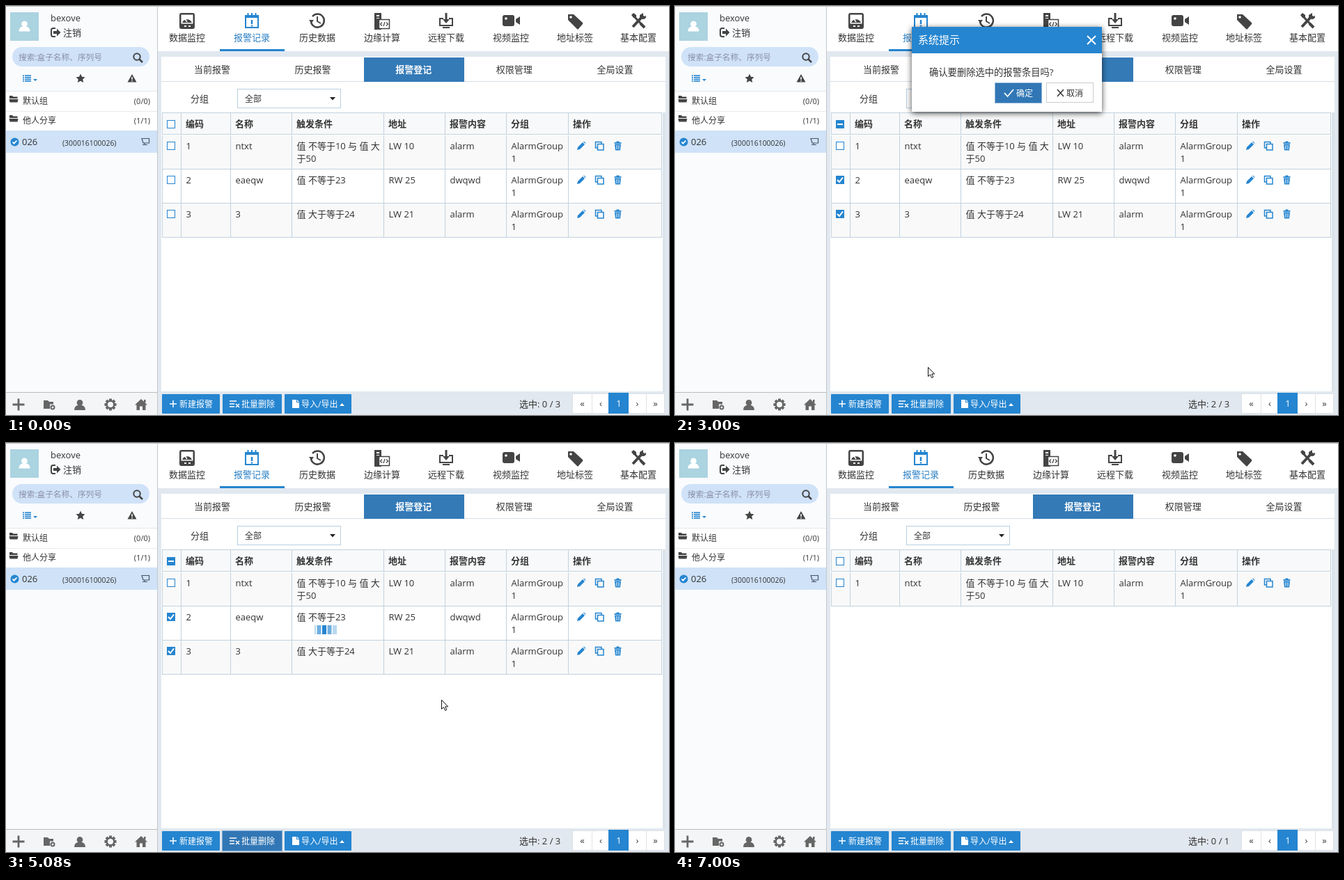
These frames come from a looping animation (952x588 px, 7.08 s). An HTML page:

```html
<!DOCTYPE html>
<html lang="zh-CN">
<head>
<meta charset="utf-8">
<title>报警登记</title>
<style>
html, body { margin: 0; width: 100%; height: 100%; overflow: hidden; background: #fff; }
svg { display: block; width: 100%; height: 100%; }
text { font-family: "Open Sans", "Noto Sans CJK SC", "Noto Sans CJK", "Noto Sans", sans-serif; font-size: 13px; fill: #333; white-space: pre; }
.mid { text-anchor: middle; }
.s12 { font-size: 12px; }
.s11 { font-size: 11px; }
.bold { font-weight: 700; }
.white { fill: #fff; }
.blue { fill: #2a7fc4; }
.line { fill: none; stroke-width: 1.5; }
#dialog { filter: drop-shadow(0 2px 4.5px rgba(0, 0, 0, .72)); }
</style>
</head>
<body>
<svg id="stage" viewBox="0 0 952 588"></svg>
<script>
const LOOP = 7080, FRAME = 1000 / 13;
const BLUE = '#2585d0', DARK = '#3277b5', INK = '#444', GRID = '#c2d2de';

const rect = (x, y, w, h, fill, extra = '') =>
  `<rect x="${x}" y="${y}" width="${w}" height="${h}" fill="${fill}" ${extra}/>`;
const box = (x, y, w, h, stroke, fill = '#fff', extra = '') =>
  rect(x + .5, y + .5, w - 1, h - 1, fill, `stroke="${stroke}" ${extra}`);
// y is the vertical centre of the line
const text = (x, y, s, cls = '', extra = '') =>
  `<text x="${x}" y="${y + 5}" class="${cls}" ${extra}>${s}</text>`;
const fill = (d, color, extra = '') => `<path d="${d}" fill="${color}" ${extra}/>`;
const line = (d, color, width = 1.5, extra = '') =>
  `<path d="${d}" class="line" stroke="${color}" style="stroke-width:${width}" ${extra}/>`;
const at = (x, y, body, id = '') => `<g ${id && `id="${id}"`} transform="translate(${x} ${y})">${body}</g>`;

const person = 'M0-8a4.3 4.3 0 0 1 2.5 7.8Q8 1 8 7H-8Q-8 1-2.5-.2A4.3 4.3 0 0 1 0-8Z';
const folder = 'M-6-5h4l1.5 1.5h6V-1H-6ZM-6.5 0H6.5L5.5 4.5H-5.5Z';

function sidebar() {
  const grey = '#666';
  const groupRow = (y, name, count) =>
    at(11, y, fill(folder, INK)) + text(24, y + 1.5, name, 's12') +
    text(207, y + 2, count, 's11', 'text-anchor="end"');
  const teeth = [0, 45, 90, 135].map(a => rect(-2, -8.5, 4, 17, grey, `transform="rotate(${a})"`)).join('');
  return rect(0, 0, 217, 588, '#f9fbfd') + rect(0, 122, 217, 57, '#fff') +
    rect(6, 9, 41, 41, '#abd3e0') + at(26.5, 29.5, fill(person, '#fff')) +
    text(64, 17, 'bexove') +
    at(71, 38, line('M0-6H-3.5Q-6-6-6-3V3Q-6 6-3.5 6H0', INK, 2) + fill('M-3-2H2V-5.5L7.5 0 2 5.5V2H-3Z', INK)) +
    text(82, 38, '注销') +
    rect(9, 59, 197, 28, '#cfe2f8', 'rx="14"') +
    text(18, 73, '搜索:盒子名称、序列号', '', 'style="font-size:11.7px;fill:#8a8fa6"') +
    at(189, 74, `<circle cx="-1" cy="-1" r="4.7" class="line" stroke="${INK}" style="stroke-width:2"/>` + line('M2.5 2.5L7 7', INK, 2.5)) +
    at(30, 104, [-4, -1.3, 1.4, 4].map(y => rect(-6, y - .8, 2, 1.6, BLUE) + rect(-3, y - .8, 9, 1.6, BLUE)).join('') + fill('M9 1h6l-3 3Z', BLUE)) +
    at(107, 104, fill('M0-6.5L2-2.2 6.5-1.8 3.2 1.4 4.2 6 0 3.7-4.2 6-3.2 1.4-6.5-1.8-2-2.2Z', INK)) +
    at(181, 104, fill('M0-6L6.5 5.5H-6.5Z', INK) + line('M0-2V2M0 3V4.5', '#fff')) +
    rect(0, 122, 217, 1, '#e3e7eb') + rect(0, 151, 217, 1, '#e8ebee') +
    groupRow(134, '默认组', '(0/0)') + groupRow(162, '他人分享', '(1/1)') +
    rect(0, 179, 217, 32, '#cfe2f8') +
    at(12.5, 195.5, `<circle r="6" fill="${BLUE}"/>` + line('M-3 0L-1 2.2 3-2', '#fff', 1.8), 'synced') +
    at(12.5, 195.5, '<circle r="6" fill="#8e1fa8"/>' + line('M0-3.5V3M-2.8 .3L0 3.2 2.8 .3', '#fff', 1.6), 'syncing') +
    text(23, 195, '026') + text(81, 196, '(300016100026)', '', 'style="font-size:10.4px"') +
    at(200, 195, line('M-5-4.5H5.5V2H-3ZM-1 2V4.5M-4 4.5H3', '#456', 1.2)) +
    rect(0, 555, 217, 33, '#f3f5f7') + rect(0, 555, 217, 1, '#bbb') +
    at(18, 573, line('M-8.5 0H8.5M0-8.5V8.5', grey, 2.8)) +
    at(62, 573, fill('M-8-6H-2L0-4H6V-.5H1V6H-8Z', grey) + `<circle cx="5" cy="4" r="2.5" class="line" stroke="${grey}" style="stroke-width:2"/>`) +
    at(106, 574, fill(person, grey)) +
    at(150, 573, teeth + `<circle r="6.5" fill="${grey}"/><circle r="4" fill="#f3f5f7"/>`) +
    at(194, 573, fill('M0-8L9 .5H6.5V8H2V2.5H-2V8H-6.5V.5H-9Z', grey) + rect(4, -7, 2.5, 4, grey)) +
    rect(217, 0, 1, 588, '#c4c8cc');
}

function navigation() {
  const items = [
    ['数据监控', 260, box(-11, -11, 22, 23, INK, INK, 'rx="2"') + rect(-8.5, -8.5, 17, 13, '#fff') +
      fill('M-7 3A7.5 7.5 0 0 1 7 3Z', INK) + line('M0 2L-3-2', '#fff') + rect(-4, 7, 3, 2, '#fff') + rect(2, 7, 3, 2, '#fff')],
    ['报警记录', 353, line('M-9-7H9V10H-9Z', BLUE, 2) + rect(-10, -8, 20, 4, BLUE) +
      line('M-5.5-11V-5M0-11V-5M5.5-11V-5', BLUE, 2) + line('M0-1V5M0 6.5V8.5', BLUE, 2.5)],
    ['历史数据', 447, line('M-9 2A9.5 9.5 0 1 0-7-6', INK, 2.5) + fill('M-12-1H-5L-8.5 4Z', INK) + line('M0-6V1L5 4', INK, 2)],
    ['边缘计算', 540, rect(-11, -11, 10, 24, INK) + rect(-8, -8, 4, 2, '#fff') + rect(-8, -4, 4, 1, '#fff') +
      box(-5, -2, 16, 14, INK, '#fff', 'stroke-width="1.5"') + line('M0 2.5L-2.5 5 0 7.5M6 2.5L8.5 5 6 7.5M4 2L2 8', INK, 1.2)],
    ['远程下载', 632, line('M-4-3H-9V7H9V-3H4', INK, 2) + rect(-5, 9, 10, 2, INK) + fill('M-1.5-11H1.5V-2H5L0 4-5-2H-1.5Z', INK)],
    ['视频监控', 725, rect(-12, -8, 17, 16, INK, 'rx="3"') + '<circle cx="-7" cy="-3" r="1.8" fill="#fff"/>' + fill('M7-2L13-6V6L7 2Z', INK)],
    ['地址标签', 817, fill('M-10-9H-2L11 3Q12 4 11 5L5 12Q4 13 3 12L-10-1Z', INK) + '<circle cx="-6" cy="-5" r="1.8" fill="#fff"/>'],
    ['基本配置', 908, line('M-7-7L8 9', INK, 3) + line('M5-5L-8 9', INK, 4) +
      fill('M-10-8L-7-11-3-8V-4H-7Z', INK) + fill('M2-4V-8L7-11V-7L10-6 11-8Q12-2 6-2Z', INK) + line('M3 4L9 10', INK, 4)]
  ];
  return rect(218, 0, 734, 65, '#fff') + rect(0, 0, 952, 1, '#bfc3c7') +
    items.map(([name, x, icon], i) => at(x, 21, icon) + text(x, 45, name, 'mid' + (i === 1 ? ' blue' : ''))).join('') +
    rect(307, 62, 93, 3, BLUE);
}

function tabs() {
  const names = ['当前报警', '历史报警', '报警登记', '权限管理', '全局设置'];
  return rect(223, 73, 724, 481, '#fff') + rect(223, 108, 724, 1, '#d8dfe5') + rect(514, 74, 144, 35, '#337ab7') +
    names.map((name, i) => text(296 + i * 144.6, 91, name, 'mid' + (i === 2 ? ' white bold' : ''))).join('') +
    text(265, 133, '分组') + box(332, 119, 149, 28, '#b9cfe0') + text(343, 133, '全部', 's12') + fill('M465 131h8l-4 4.5Z', '#222');
}

const columns = [224, 251, 322, 410, 542, 630, 718, 807, 941];
const checkbox = (y, id, mark) => box(231, y - 6, 12, 12, BLUE) +
  `<g id="${id}">${rect(231, y - 6, 12, 12, BLUE)}${line(mark, '#fff', 2, `transform="translate(237 ${y})"`)}</g>`;
const tick = 'M-4 0L-1 3 4-3.5';

function tableRow(y, height, tint) {
  return rect(224, y, 718, height, tint) + rect(224, y + height - 1, 718, 1, GRID) +
    columns.map(x => rect(x, y, 1, height, GRID)).join('');
}

function alarmRow(n, [name, condition, more, address, content]) {
  const c = 152 + 49 * n;
  const cells = [n, name, condition, address, content, 'AlarmGroup'];
  return tableRow(c - 15, 49, n % 2 ? '#f9f9f9' : '#fff') + checkbox(c, 'check' + n, tick) +
    cells.map((s, i) => text(columns[i + 1] + 7.5, c, s)).join('') +
    text(417.5, c + 17.5, more) + text(725.5, c + 17.5, '1') +
    at(826, c, fill('M-6 6L-5 2 2-5 5-2-2 5ZM3-6L4-6.5 6.5-4 6-3Z', BLUE)) +
    at(852, c, line('M-2.5-2.5H6V6H-2.5ZM-2.5 3H-5.5V-5.5H3V-2.5', BLUE)) +
    at(878.5, c, rect(-5, -5, 10, 1.8, BLUE) + rect(-2, -6.5, 4, 2, BLUE) + fill('M-4.5-2.5H4.5L3.5 6.5H-3.5Z', BLUE) + line('M-1.5-1V5M1.5-1V5', '#fff', 1));
}

function table() {
  const heads = ['编码', '名称', '触发条件', '地址', '报警内容', '分组', '操作'];
  return rect(943, 153, 4, 401, '#dbe3ea') +
    tableRow(153, 33, '#f8f9fa').replaceAll('height="33"', 'height="32"') .replace('y="185"', 'y="184"') +
    rect(224, 153, 718, 1, GRID) + checkbox(170, 'checkAll', 'M-4 0H4') +
    heads.map((s, i) => text(columns[i + 1] + 7, 169, s, 'bold')).join('') +
    alarmRow(1, ['ntxt', '值 不等于10 与 值 大', '于50', 'LW 10', 'alarm']) +
    '<g id="removable">' +
    alarmRow(2, ['eaeqw', '值 不等于23', '', 'RW 25', 'dwqwd']) +
    alarmRow(3, ['3', '值 大于等于24', '', 'LW 21', 'alarm']) + '</g>';
}

function footer() {
  const button = (id, x, w) => rect(x, 558, w, 28, BLUE, 'rx="1"') +
    box(x - 1, 557, w + 2, 30, '#7fabd6', DARK, `id="${id}"`);
  const cells = [[813, 29, '«'], [841, 26, '‹'], [866, 28, '1'], [893, 27, '›'], [919, 27, '»']];
  return rect(218, 554, 734, 34, '#e1e8ef') +
    button('addFocus', 224, 83) + line('M235 572H245M240 567V577', '#fff') + text(249, 572, '新建报警', 's12 white') +
    button('deleteFocus', 311, 85) + line('M321 568H331M321 572H328M321 576H328M330 572L335 577M335 572L330 577', '#fff') + text(338, 572, '批量删除', 's12 white') +
    rect(400, 558, 96, 28, BLUE, 'rx="1"') + fill('M411 566H417V570H421V578H411ZM418 566L421 569H418Z', '#fff') +
    text(424, 572, '导入/导出', 's12 white') + fill('M479 575L482.5 571 486 575Z', '#fff') +
    text(737, 572, '', '', 'id="selected"') +
    cells.map(([x, w, s], i) => (i === 2 ? '' : box(x, 557, w, 29, '#dfe3e7') + text(x + w / 2, 571, s, 'mid'))).join('') +
    rect(865, 556, 29, 30, BLUE) + text(880, 571, '1', 'mid white');
}

function dialog() {
  return '<g id="dialog">' + rect(340, 30, 273, 122, '#fff') + rect(340, 30, 273, 38, BLUE) +
    text(349, 49, '系统提示', 'white', 'style="font-size:15px"') + line('M592 43L604 55M604 43L592 55', '#fff', 2) +
    text(365, 95, '确认要删除选中的报警条目吗?', '', 'style="font-size:13.3px"') +
    box(459, 110, 68, 30, '#8db4da', DARK) + rect(461, 112, 64, 1, '#2b679e', 'id="pressed"') +
    line('M473 125L477.5 130 486 120', '#fff', 1.8) + text(490, 125, '确定', 's12 white') +
    box(533, 110, 68, 29, '#ccc') + line('M549 120L558 130M558 120L549 130', '#333') + text(562, 125, '取消', 's12') + '</g>';
}

function loader() {
  let bars = '';
  for (let i = -1; i <= 8; i++) bars += rect(446.5 + 7.5 * i, 262, 6, 13, BLUE, 'class="bar"');
  return `<clipPath id="slot">${rect(443, 262, 67, 13, '#000')}</clipPath><g id="loader" clip-path="url(#slot)">${bars}</g>`;
}

const pointer = '<g id="cursor">' +
  '<path id="arrow" d="M.5 .5V13.5L3.5 10.8 5.6 15.5 7.8 14.5 5.7 10H9.7Z" fill="#fff" stroke="#111"/>' +
  '<path id="hand" d="M-2 1.5Q-2 0-.5 0T1 1.5V6.5Q3 5.5 3.8 7 5.6 6.3 6.2 7.8 8.4 7.4 8.4 9.5V13Q8.4 15 7 17V19H-1.5V17L-5.5 12Q-6.3 10-4.5 9.7L-2 11.5ZM3.8 7V10M6.2 7.8V10.5M1 6.5V10" fill="#fff" stroke="#111"/></g>';

document.getElementById('stage').innerHTML = rect(0, 0, 952, 588, '#e1e8ef') +
  sidebar() + navigation() + tabs() + table() + footer() + loader() + dialog() + pointer;

const $ = id => document.getElementById(id);
const show = (id, on) => $(id).style.display = on ? '' : 'none';
const bars = [...document.querySelectorAll('.bar')];

// time, x, y of the pointer tip
const route = [
  [60, 857, 576], [230, 620, 430], [380, 340, 305], [500, 118, 246], [600, 145, 238], [760, 213, 262],
  [1000, 224, 260], [1210, 233, 253], [1370, 233, 253], [1755, 234, 300], [1915, 234, 300],
  [2450, 335, 548], [2670, 345, 566], [2912, 345, 566], [3600, 504, 136], [4070, 504, 136],
  [4830, 625, 369], [6070, 625, 369], [6140, 730, 420], [6300, 874, 555], [6370, 880, 590]
];

function position(t) {
  const i = route.findIndex(p => p[0] > t);
  if (i < 1) return null;
  const [t0, x0, y0] = route[i - 1], [t1, x1, y1] = route[i];
  const u = (t - t0) / (t1 - t0);
  return [x0 + (x1 - x0) * u, y0 + (y1 - y0) * u];
}

function clickable(x, y, asking) {
  if (asking) return x > 459 && x < 527 && y > 110 && y < 140;
  return (y > 557 && x > 223 && x < 496) ||
    (x > 230 && x < 243 && [201, 250, 299].some(c => Math.abs(y - c) < 7));
}

function draw(t) {
  const within = (a, b) => t >= a && t < b;
  const frame = Math.floor((t + 16) / FRAME);
  const asking = within(3000, 4160), removed = t >= 5770;
  const chosen = removed || t < 1370 ? 0 : t < 1990 ? 1 : 2;

  show('checkAll', chosen > 0);
  show('check1', false);
  show('check2', chosen > 0);
  show('check3', chosen > 1);
  show('removable', !removed);
  $('selected').textContent = `选中: ${chosen} / ${removed ? 1 : 3}`;
  show('addFocus', within(1215, 2760));
  show('deleteFocus', within(2670, 3000) || within(4160, 7000));
  show('dialog', asking);
  show('pressed', t >= 4010);
  show('syncing', within(5700, 6540));
  show('synced', !within(5700, 6540));

  show('loader', within(4930, 5540));
  const peak = t < 5080 ? 0 : frame - 65;
  bars.forEach((bar, i) => bar.style.opacity = Math.max(0, 1 - .34 * Math.abs(i - 1 - peak)));

  const p = frame > 0 && position(frame * FRAME - 12);
  show('cursor', p);
  if (p) {
    const hand = clickable(p[0], p[1], asking);
    show('hand', hand);
    show('arrow', !hand);
    $('cursor').setAttribute('transform', `translate(${p.map(Math.round).join(' ')})`);
  }
}

const start = performance.now();
function animate() {
  draw((performance.now() - start) % LOOP);
  requestAnimationFrame(animate);
}
animate();
</script>
</body>
</html>
```
